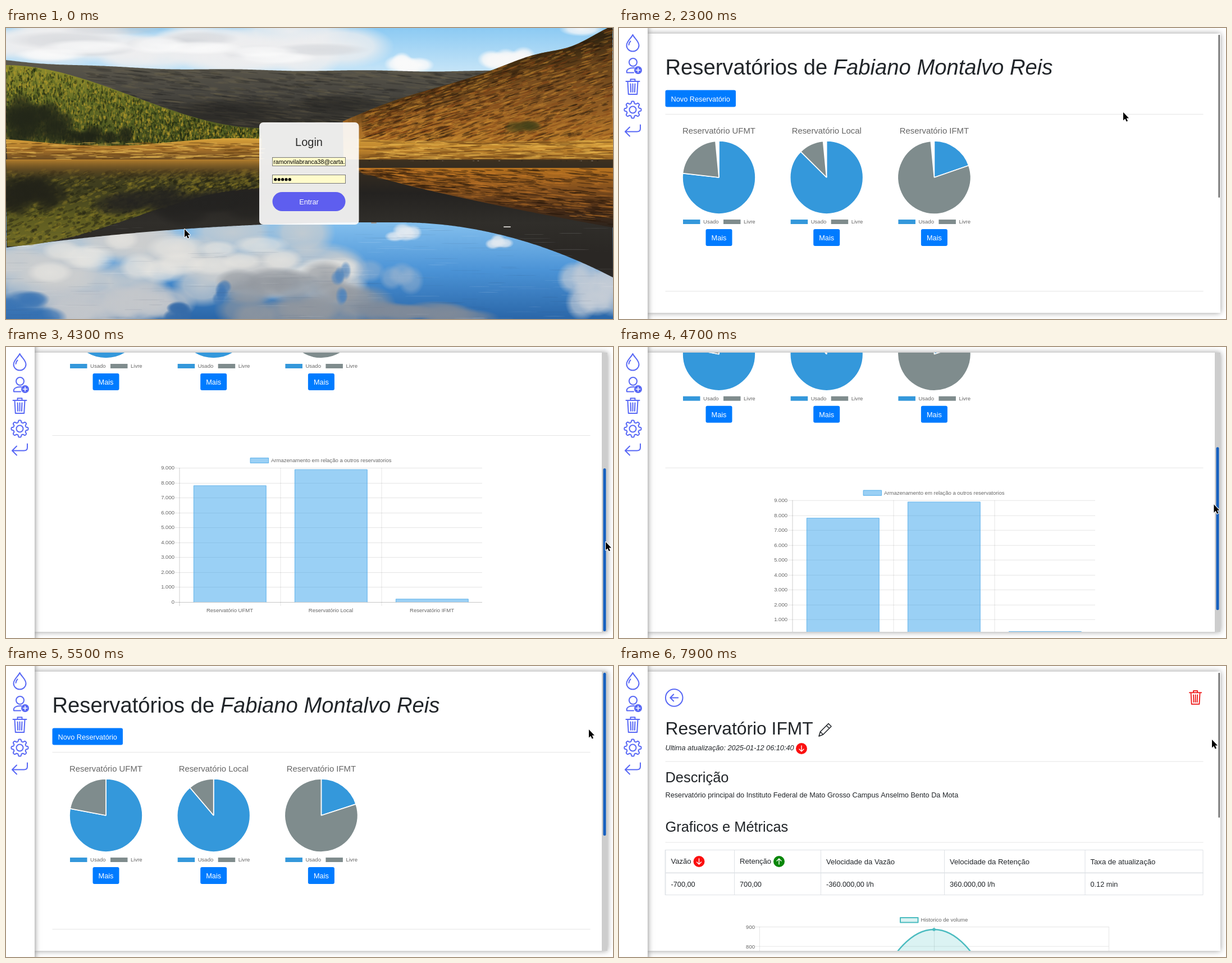
These frames come from a looping animation (1081x518 px, 8 s). An HTML page with a canvas:

```html
<!DOCTYPE html>
<html lang="pt">
<head>
<meta charset="utf-8">
<title>Reservatórios</title>
<style>
html, body { margin: 0; width: 100%; height: 100%; overflow: hidden; background: #fff; }
canvas { display: block; }
</style>
</head>
<body>
<canvas id="stage" width="1081" height="518"></canvas>
<script>
const W = 1081, H = 518, LOOP = 8000, TAU = Math.PI * 2;
const SANS = '"Liberation Sans", Arial, sans-serif';
const INK = '#212529', GREY = '#666', VIOLET = '#5868f5', BLUE = '#007bff', RULE = 'rgba(0,0,0,.1)';
const LABEL = 9.54, BODY = 12.72;
const stage = document.getElementById('stage').getContext('2d');
let c = stage;

const clamp = (v, a, b) => Math.min(b, Math.max(a, v));
const easeOut = t => 1 - (1 - clamp(t, 0, 1)) ** 4;

// ---- drawing helpers ----
function text(s, x, y, size, color = INK, align = 'left', style = '') {
  c.font = `${style} ${size}px ${SANS}`;
  c.textAlign = align;
  c.fillStyle = color;
  c.fillText(s, x, y);
}
function rect(x, y, w, h, color) {
  c.fillStyle = color;
  c.fillRect(x, y, w, h);
}
function box(x, y, w, h, r, color) {
  c.beginPath();
  c.roundRect(x, y, w, h, r);
  c.fillStyle = color;
  c.fill();
}
function frame(x, y, w, h, color, width = 1) {
  c.strokeStyle = color;
  c.lineWidth = width;
  c.strokeRect(x, y, w, h);
}
function disc(x, y, r, color) {
  c.beginPath();
  c.arc(x, y, r, 0, TAU);
  c.fillStyle = color;
  c.fill();
}
function ring(x, y, r, color, width = 2) {
  c.beginPath();
  c.arc(x, y, r, 0, TAU);
  c.strokeStyle = color;
  c.lineWidth = width;
  c.stroke();
}
function stroke(d, color, width = 2) {
  c.strokeStyle = color;
  c.lineWidth = width;
  c.lineCap = c.lineJoin = 'round';
  c.stroke(new Path2D(d));
}
function at(x, y, scale, draw) {
  c.save();
  c.translate(x, y);
  c.scale(scale, scale);
  draw();
  c.restore();
}
function clipTo(x, y, w, h, draw) {
  c.save();
  c.beginPath();
  c.rect(x, y, w, h);
  c.clip();
  draw();
  c.restore();
}
function ramp(y0, y1, ...colors) {
  const g = c.createLinearGradient(0, y0, 0, y1);
  colors.forEach((k, i) => g.addColorStop(i / (colors.length - 1), k));
  return g;
}

// ---- lake picture ----
function paintLake() {
  const layer = document.createElement('canvas');
  layer.width = W;
  layer.height = H;
  c = layer.getContext('2d');
  let seed = 11;
  const rnd = (a = 0, b = 1) => a + (b - a) * ((seed = (seed * 16807) % 2147483647) / 2147483647);
  const smooth = k => k * k * (3 - 2 * k);

  const shore = 234, woodEnd = 455, hillStart = 600;
  const moor = x => 77 - 20 * Math.exp(-x / 200) + Math.sin(x / 37);
  const wood = x => 66 + 112 * smooth(clamp(x / woodEnd, 0, 1));
  const hill = x => {
    const u = (x - hillStart) / (W - hillStart);
    return 166 - 172 * u + 16 * Math.exp(-(((u - .85) / .12) ** 2)) - 4 * Math.sin(u * 9);
  };
  const waterline = x => 346 + 45 * Math.max(0, 1 - x / 650) ** 2 + 98 * Math.max(0, (x - 700) / 381) ** 2;

  function band(x0, x1, top, bottom, fill) {
    c.beginPath();
    for (let x = x0; x <= x1; x += 3) c.lineTo(x, top(x));
    for (let x = x1; x >= x0; x -= 3) c.lineTo(x, bottom(x));
    c.fillStyle = fill;
    c.fill();
  }
  function specks(n, x0, x1, top, bottom, w, h, tilt, ...colors) {
    for (let i = 0; i < n; i++) {
      const x = rnd(x0, x1);
      c.fillStyle = colors[i % colors.length];
      c.beginPath();
      c.ellipse(x, rnd(top(x) + h, bottom(x)), w * rnd(.4, 1.3), h * rnd(.4, 1.3), tilt, 0, TAU);
      c.fill();
    }
  }
  function puff(x, y, rx, ry, rgb, a = 1) {
    c.save();
    c.translate(x, y);
    c.scale(rx, ry);
    const g = c.createRadialGradient(0, 0, 0, 0, 0, 1);
    g.addColorStop(0, `rgba(${rgb},${a})`);
    g.addColorStop(.6, `rgba(${rgb},${a * .8})`);
    g.addColorStop(1, `rgba(${rgb},0)`);
    c.fillStyle = g;
    c.fillRect(-1, -1, 2, 2);
    c.restore();
  }
  function clouds(n, x0, x1, y0, y1, rx, ry, rgb, a) {
    for (let i = 0; i < n; i++) puff(x0 + (x1 - x0) * (i + rnd()) / n, rnd(y0, y1), rx * rnd(.7, 1.2), ry * rnd(.7, 1.2), rgb, a);
  }
  const level = y => () => y;

  rect(0, 0, W, 160, ramp(0, 85, '#8ccaf3', '#cbe7f8'));
  clouds(16, -20, 600, 5, 55, 90, 42, '238,238,239', .95);
  clouds(7, 40, 560, 0, 50, 90, 14, '204,207,212', .55);
  clouds(6, 0, 560, 25, 60, 70, 14, '252,252,252', .8);
  clouds(4, 695, 735, 60, 72, 26, 18, '250,250,250', 1);
  clouds(5, 855, 925, 42, 70, 30, 20, '248,248,248', 1);
  puff(1025, 2, 40, 13, '242,245,248');

  // land
  band(0, 900, moor, level(240), ramp(60, 170, '#5c584c', '#484640', '#33312c'));
  specks(900, 150, 850, moor, level(172), 16, 1.6, .1, 'rgba(28,28,27,.22)', 'rgba(118,108,82,.2)');
  puff(400, 148, 120, 24, '36,35,33', .6);
  puff(590, 135, 90, 18, '36,35,33', .6);

  band(0, woodEnd, wood, level(216), ramp(70, 215, '#8c8a2c', '#626a25', '#424a20'));
  specks(5200, 0, woodEnd, wood, level(212), 1.5, 3.2, 0, 'rgba(34,44,18,.6)', 'rgba(186,158,44,.45)', 'rgba(78,92,34,.6)');
  clouds(9, 0, 100, 145, 190, 30, 32, '34,38,24', .85);
  clouds(5, 115, 215, 188, 198, 22, 18, '30,34,22', .9);
  band(0, woodEnd, x => 203 + 7 * Math.sin(x / 75 - .8), level(shore), ramp(198, shore, '#d6a03a', '#a8722a', '#6b4b22'));
  specks(260, 0, woodEnd, level(203), level(shore), 16, 1, 0, 'rgba(110,72,24,.6)', 'rgba(232,186,84,.6)');

  band(hillStart, W, hill, level(240), ramp(10, 235, '#3f2d16', '#6a451b', '#855522', '#a86d27', '#c38a30'));
  for (let d = 8; d < 48; d += 8) band(hillStart + d, W, hill, x => Math.min(hill(x) + d, 190), 'rgba(38,26,12,.12)');
  specks(2600, hillStart + 40, W, hill, level(200), 9, 1.3, -.3, 'rgba(40,26,12,.4)', 'rgba(206,142,52,.35)', 'rgba(130,66,24,.35)');
  clouds(4, 900, 950, 172, 186, 24, 12, '66,64,24', .7);
  band(625, W, x => 198 + 8 * Math.sin((x - 640) / 140), level(238), ramp(196, 238, '#cf9a38', '#bd822c', '#8a5c22'));
  specks(420, 640, W, level(200), level(236), 18, 1.1, 0, 'rgba(112,70,24,.55)', 'rgba(236,186,80,.5)');
  rect(0, shore, W, 16, '#41321f');
  specks(420, 625, W, level(236), level(248), 2, 1.1, 0, '#a3968a', '#221c16');

  // water
  rect(0, 250, W, H - 250, ramp(345, H, '#84c0ee', '#4b93d6', '#2a66a8'));
  clouds(26, -20, 610, 360, 470, 75, 40, '205,206,206', .85);
  clouds(12, 90, 300, 460, 515, 50, 34, '196,199,203', .85);
  clouds(18, 20, 600, 375, 440, 45, 22, '232,230,225', .75);
  clouds(16, 400, 640, 440, 518, 55, 30, '146,151,158', .75);
  clouds(7, 640, 820, 496, 518, 60, 18, '128,138,152', .8);
  clouds(5, 0, 70, 482, 518, 40, 20, '58,116,180', .85);
  clouds(5, 295, 325, 495, 518, 18, 14, '52,106,168', .9);
  clouds(5, 378, 390, 450, 490, 11, 15, '66,120,180', .8);
  clouds(5, 590, 606, 430, 480, 12, 16, '74,130,190', .7);
  clouds(4, 640, 735, 400, 450, 26, 30, '160,182,206', .55);
  clouds(4, 690, 728, 356, 374, 18, 13, '226,233,240', .9);
  clouds(3, 862, 890, 378, 392, 16, 12, '228,234,240', .9);
  clouds(8, 1010, 1090, 425, 500, 34, 34, '198,205,214', .8);

  band(0, W, level(shore + 3), waterline, ramp(240, 400, '#3a2f20', '#242220', '#302e2a', '#2a2724'));
  const mirror = x => shore + (shore - wood(x)) * .92;
  band(0, woodEnd, level(shore), mirror, ramp(shore, 388, '#4b4520', '#3d3c1e', '#5d5b20', '#6f6a26'));
  specks(1500, 0, woodEnd, level(250), mirror, 5, 2.2, -.35, 'rgba(36,36,20,.4)', 'rgba(150,132,40,.3)');
  clouds(9, 0, 90, 275, 325, 30, 28, '34,34,24', .8);
  clouds(8, 180, 440, 300, 330, 60, 28, '35,34,32', .75);
  band(0, woodEnd, level(shore), level(272), ramp(shore, 272, 'rgba(186,130,46,.95)', 'rgba(110,78,34,.6)', 'rgba(60,48,28,0)'));
  band(625, W, level(249), x => 250 + 105 * ((x - 620) / 460) ** .8,
    ramp(249, 355, '#b8731f', '#84501d', '#4c2e17', '#2c231c'));
  specks(900, 640, W, level(250), x => 250 + 100 * ((x - 620) / 460) ** .8, 14, 1.2, .08, 'rgba(40,24,12,.45)', 'rgba(206,126,44,.3)');
  specks(220, 0, W, level(350), level(H), 28, .5, 0, 'rgba(255,255,255,.12)', 'rgba(40,60,90,.1)');
  box(886, 353, 13, 2, 1, '#c8c5c0');
  box(650, 346, 10, 2, 1, '#9a9895');
  c = stage;
  return layer;
}
const lake = paintLake();

// ---- login ----
function login(hover) {
  c.drawImage(lake, 0, 0);
  box(451, 168, 177.5, 182, 7, 'rgba(255,255,255,.9)');
  text('Login', 539.5, 209.5, 20, '#2b2b2b', 'center');
  for (const y of [230.5, 261.5]) {
    rect(474.5, y, 130, 15, '#fffbcb');
    frame(474.5, y, 130, 15, '#777');
  }
  clipTo(476, 231, 128, 15, () => text('ramonvilabranca38@carta.com', 476.3, 242, 10.6, '#000'));
  for (let i = 0; i < 5; i++) disc(479.8 + i * 6.4, 269.7, 2.6, '#000');
  box(474.5, 292, 130, 34, 17, hover ? '#fff' : '#5e5eef');
  text('Entrar', 539.5, 313.5, BODY, hover ? '#5656ea' : '#fff', 'center');
}
function statusBar() {
  box(0, 502, 207, 18, [0, 3, 0, 0], '#343536');
  c.font = '9.3px "Noto Sans", sans-serif';
  c.textAlign = 'left';
  c.fillStyle = '#e2e2e2';
  c.fillText('localhost', 1, 514);
}

// ---- icons ----
function bin(x, y, scale, color) {
  at(x, y, scale, () => {
    stroke('M1 5H25M9 4V1.2H17V4M4 5.5L5.3 28H20.7L22 5.5', color);
    for (let i = -1; i <= 1; i++) stroke(`M${13 + i * 4} 9.5L${13 + i * 3.4} 24`, color);
  });
}
function gear(x, y) {
  c.beginPath();
  for (let a = 0; a <= TAU + .01; a += TAU / 160) {
    const r = 13.2 + 1.9 * Math.tanh(2.2 * Math.cos(a * 8));
    c.lineTo(x + r * Math.cos(a), y + r * Math.sin(a));
  }
  c.strokeStyle = VIOLET;
  c.lineWidth = 2;
  c.stroke();
  ring(x, y, 6, VIOLET);
}
function badge(x, y, color, up) {
  disc(x, y, 10, color);
  at(x, y, 1, () => {
    if (up) c.rotate(Math.PI);
    stroke('M0 -5V5M-4 1L0 5L4 1', '#fff', 1.4);
  });
}
function sidebar() {
  c.save();
  c.shadowColor = 'rgba(0,0,0,.5)';
  c.shadowBlur = 10;
  rect(-20, -20, 71, H + 40, '#fff');
  c.restore();
  at(24.5, 12, 1, () => stroke('M0 0C-2.5 6 -11 11.5 -11 19A11 10.5 0 0 0 11 19C11 11.5 2.5 6 0 0ZM-7 18Q-6.5 14 -4 11.5', VIOLET));
  ring(25, 61, 7, VIOLET);
  stroke('M26 79.5H14C12.5 74 18 70.5 27 71', VIOLET);
  disc(34, 75, 7, VIOLET);
  at(34, 75, 1, () => stroke('M-3.5 0H3.5M0 -3.5V3.5', '#fff', 1.6));
  bin(11.5, 90, 1, VIOLET);
  gear(24.5, 145.5);
  at(11, 184.5, 1, () => stroke('M27 -12V-5.5Q27 0 21 0H.5M8 -8L0 0L8 8', VIOLET));
}

// ---- dashboard ----
const TANKS = [
  { name: 'UFMT', volume: 7800, capacity: 10000 },
  { name: 'Local', volume: 8880, capacity: 10000 },
  { name: 'IFMT', volume: 200, capacity: 1000 }
];
function button(x, y, w, label, hover) {
  box(x, y, w, 30, 3, hover ? '#0a69de' : BLUE);
  text(label, x + w / 2, y + 20, BODY, '#fff', 'center');
}
function hr(y) {
  rect(82.5, y, 958, 1, RULE);
}
function slice(x, y, a, b, color) {
  c.beginPath();
  c.moveTo(x, y);
  c.arc(x, y, 65, a, b);
  c.closePath();
  c.fillStyle = color;
  c.fill();
  c.strokeStyle = '#fff';
  c.lineWidth = 1.7;
  c.lineJoin = 'bevel';
  c.stroke();
}
function key(x, label, color) {
  rect(x, 341, 30.5, 8, color);
  text(label, x + 36, 348, LABEL, GREY);
}
function pie(x, tank, grow, hover) {
  const top = -TAU / 4, end = top + grow * TAU, mid = top + grow * TAU * tank.volume / tank.capacity;
  text('Reservatório ' + tank.name, x, 187.5, 14.9, GREY, 'center');
  slice(x, 266, top, mid, '#3498db');
  slice(x, 266, mid, end, '#7f8c8d');
  key(x - 64, 'Usado', '#3498db');
  key(x + 8, 'Livre', '#7f8c8d');
  button(x - 23.5, 358, 47, 'Mais', hover);
}
function bars() {
  const zero = 765, unit = 239 / 9000, edge = '#5fb2ea';
  rect(435, 508, 33, 10, '#9ad0f5');
  frame(435.5, 508.5, 32, 9, edge);
  text('Armazenamento em relação a outros reservatorios', 472, 516, LABEL, GREY);
  for (let v = 0; v <= 9; v++) {
    const y = Math.round(zero - v * 1000 * unit);
    rect(301, y, 547, 1, v ? RULE : 'rgba(0,0,0,.22)');
    text(v ? v + '.000' : '0', 300, y + 3, LABEL, GREY, 'right');
  }
  TANKS.forEach(({ name, volume }, i) => {
    const x = 334 + i * 180, h = volume * unit;
    rect(x - 25.5, 526, 1, 246, i ? RULE : 'rgba(0,0,0,.2)');
    rect(x, zero - h, 129.5, h, 'rgba(54,162,235,.5)');
    stroke(`M${x + .4} ${zero}v${-h}h128.8v${h}`, edge, .9);
    text('Reservatório ' + name, x + 64.5, 782.5, LABEL, GREY, 'center');
  });
}
function dashboard(scroll, grow, hover) {
  c.translate(0, -scroll);
  const title = 'Reservatórios de ';
  text(title, 82.5, 83, 38.2);
  text('Fabiano Montalvo Reis', 82.5 + c.measureText(title).width, 83, 38.2, INK, 'left', 'italic');
  button(82.5, 110.5, 125.5, 'Novo Reservatório');
  hr(153);
  TANKS.forEach((tank, i) => pie(178 + i * 191.7, tank, grow, hover && i === 2));
  hr(468);
  bars();
}

// ---- tank details ----
const TABLE = [
  { x: 82.5, head: 'Vazão', cell: '-700,00' },
  { x: 205, head: 'Retenção', cell: '700,00' },
  { x: 359, head: 'Velocidade da Vazão', cell: '-360.000,00 l/h' },
  { x: 579, head: 'Velocidade da Retenção', cell: '360.000,00 l/h' },
  { x: 829.5, head: 'Taxa de atualização', cell: '0.12 min' }
];
function table() {
  const line = '#dee2e6';
  frame(82.5, 327.5, 957.5, 80, line);
  rect(82.5, 367.5, 958, 1.6, line);
  TABLE.forEach(({ x, head, cell }, i) => {
    rect(x, 327, 1, 81, line);
    text(head, x + 10, i < 2 ? 351.5 : 353, 13.1);
    text(cell, x + 10, 392.5, BODY);
  });
  badge(142.5, 348, '#fb1010');
  badge(285, 348, '#0a870a', true);
}
function history(grow) {
  const teal = '#4bbcc0', left = 250, mid = 561, right = 872, base = 1127, rise = 663.4 * grow, peak = base - rise;
  rect(500, 447, 33.5, 10, '#dbf2f2');
  frame(501, 448, 31.5, 8.5, teal, 2);
  text('Historico de volume', 537.5, 455, LABEL, GREY);
  for (let i = 0; i < 2; i++) {
    const y = 464 + i * 34.6;
    rect(242, y, 630, 1, RULE);
    text(900 - i * 100, 242, y + 4, LABEL, GREY, 'right');
  }
  for (const x of [left, mid, right]) rect(x, 464, 1, 60, RULE);
  // spline through three points, tension .4
  const span = mid - left, bend = span * .4, foot = base - rise * .4;
  c.beginPath();
  c.moveTo(left, base);
  c.bezierCurveTo(left + bend, foot, mid - bend, peak, mid, peak);
  c.bezierCurveTo(mid + bend, peak, right - bend, foot, right, base);
  c.fillStyle = 'rgba(75,192,192,.2)';
  c.fill();
  c.strokeStyle = teal;
  c.lineWidth = 2.4;
  c.stroke();
  disc(mid, peak, 2.8, teal);
}
function details(grow) {
  ring(98.2, 56.5, 15.3, VIOLET);
  at(98.2, 56.5, 1, () => stroke('M7 0H-7M-1 -6L-7 0L-1 6', VIOLET));
  bin(1015, 43, .89, '#ee1515');
  text('Reservatório IFMT', 82.5, 121.5, 31.8);
  at(356, 125, 1, () => stroke('M0 0L2.5 -8L17 -22.5L22 -17.5L7.5 -3ZM2.5 -8L7.5 -3M13.5 -19L18.5 -14', INK, 1.6));
  text('Ultima atualização: 2025-01-12 06:10:40', 82.5, 150, BODY, INK, 'left', 'italic');
  badge(325, 147, '#fb1010');
  hr(169.5);
  text('Descrição', 82.5, 207, 25.4);
  text('Reservatório principal do Instituto Federal de Mato Grosso Campus Anselmo Bento Da Mota', 82.5, 234, BODY);
  text('Graficos e Métricas', 82.5, 294.5, 25.4);
  hr(313.5);
  table();
  history(grow);
}

function panel(draw) {
  rect(0, 0, W, H, '#fff');
  c.save();
  c.shadowColor = 'rgba(0,0,0,.4)';
  c.shadowBlur = 10;
  rect(51, 10, 1020, 497, '#fff');
  c.restore();
  clipTo(51, 10, 1020, 497, draw);
}
function scrollbar(top, length, wide, color) {
  if (wide) {
    rect(1061, 10, 10, 497, '#cdcdcd');
    box(1063.5, top, 5, length, 2.5, color);
  } else box(1067.5, top, 2.5, length, 1.2, color);
}

// ---- pointer ----
const HOME = { x: 318, y: 358 };
const MOVES = [
  { from: 200, to: 900, x: 552, y: 304 },
  { from: 1600, to: 2300, x: 898, y: 150 },
  { from: 2400, to: 2700, x: 1034, y: 111 },
  { from: 2900, to: 3100, x: 1066, y: 114 },
  { from: 3200, to: 4300, x: 1068, y: 347 },
  { from: 4400, to: 5450, x: 1038, y: 113 },
  { from: 5900, to: 6600, x: 567, y: 368 },
  { from: 7000, to: 7900, x: 1056, y: 131 }
];
function pointerAt(t) {
  let { x, y } = HOME;
  for (const m of MOVES) {
    const k = clamp((t - m.from) / (m.to - m.from), 0, 1);
    x += (m.x - x) * k;
    y += (m.y - y) * k;
  }
  return [x, y];
}
const ARROW = new Path2D('M0 0V14.5L3.3 11.4L5.7 16.6L8 15.6L5.7 10.6H10Z');
const HAND = new Path2D('M0 1.5Q1.5 -.5 3 1.5V6L10 7.5Q11.5 8 11 10L9.5 15.5H2L-4 9.5Q-4 7.5 -2 8L0 9.5Z');
function pointer(x, y, hand) {
  const shape = hand ? HAND : ARROW;
  at(x, y, 1, () => {
    c.strokeStyle = '#fff';
    c.lineWidth = 2;
    c.lineJoin = 'round';
    c.stroke(shape);
    c.fillStyle = '#000';
    c.fill(shape);
    if (hand) stroke('M5 8V10.5M8 8.5V10.5', '#fff', .7);
  });
}

// ---- timeline ----
const OPEN = 1650, DETAIL = 7100, THUMB = .656;
const inside = (x, y, left, top, w, h) => x > left && x < left + w && y > top && y < top + h;

function render(t) {
  const [x, y] = pointerAt(t);
  let hand = false;
  if (t < OPEN) {
    login(inside(x, y, 474, 292, 131, 34));
    if (t >= 1200) statusBar();
  } else if (t < DETAIL) {
    const drag = t >= 3200 && t < 5700;
    const scroll = drag ? clamp((y - 114) / THUMB, 0, 311) : 0;
    hand = inside(x, y, 538, 358, 47, 30);
    panel(() => dashboard(scroll, easeOut((t - OPEN) / 1000), hand));
    scrollbar(12 + scroll * THUMB, 290, t >= 3000 && t < 6000, drag ? '#1660bf' : '#696969');
    sidebar();
    if (t >= 6900) statusBar();
  } else {
    panel(() => details(easeOut((t - DETAIL - 100) / 1000)));
    scrollbar(12, 258, false, '#696969');
    sidebar();
  }
  pointer(x, y, hand);
}

const start = performance.now();
function tick() {
  const t = (performance.now() - start) % LOOP;
  render(Math.floor(t / 100) * 100); // ten pictures a second
  requestAnimationFrame(tick);
}
tick();
</script>
</body>
</html>
```
